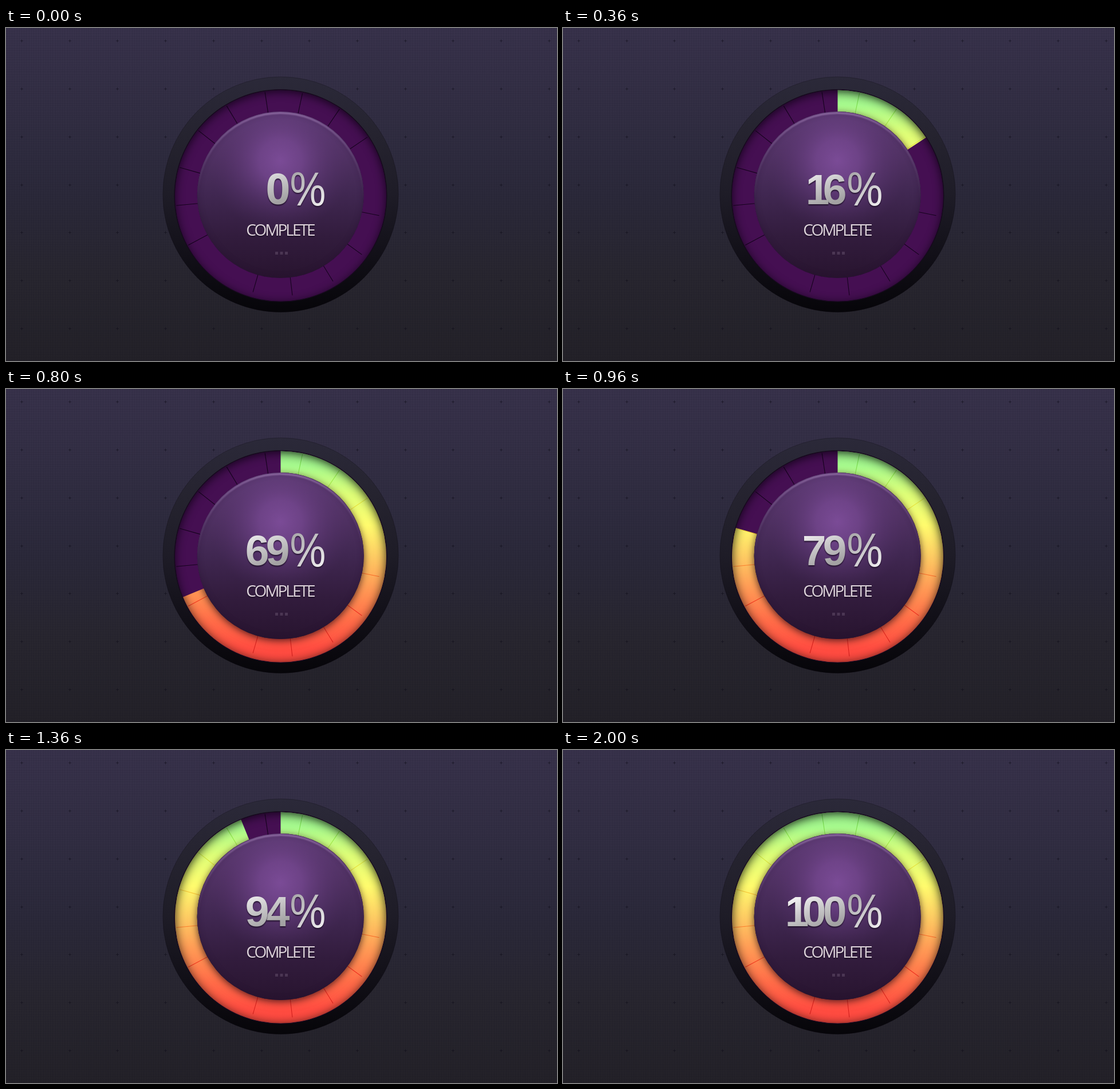
Write an HTML page with a canvas that moves like this. It is 962 px wide and 582 px high and loops after 2040 ms.

```html
<!DOCTYPE html>
<html lang="en">
<head>
<meta charset="utf-8">
<title>Progress dial</title>
<style>
html, body { margin: 0; width: 100%; height: 100%; overflow: hidden; background: #2b2938; }
canvas { display: block; }
</style>
</head>
<body>
<canvas id="stage" width="962" height="582"></canvas>
<script>
const W = 962, H = 582, TAU = Math.PI * 2;
const STEP = 40, STEPS = 51;
const CX = 479.5, CY = 293, R = 184.5;
const DISC = { x: 479.2, y: 291.5, r: 145.5 };
const TICKS = [-8.6, 12, 34.2, 56, 101.4, 126, 148.6, 173.3, 196, 241.8, 264.6, 285.6, 308.4, 329];
const ctx = document.getElementById('stage').getContext('2d');

function layer(draw) {
  const c = document.createElement('canvas');
  c.width = W; c.height = H;
  draw(c.getContext('2d'));
  return c;
}

function fillStops(grad, stops) {
  for (const [at, color] of stops) grad.addColorStop(at, color);
  return grad;
}

const vertical = (g, y0, y1, ...stops) => fillStops(g.createLinearGradient(0, y0, 0, y1), stops);

function circle(g, x, y, r) {
  g.beginPath();
  g.arc(x, y, r, 0, TAU);
}

function shadow(g, color, blur, dy) {
  g.shadowColor = color;
  g.shadowBlur = blur;
  g.shadowOffsetY = dy;
}

// Shadow cast inward from the rim of a circle
function inset(g, x, y, r, color, blur, dy) {
  g.save();
  circle(g, x, y, r);
  g.clip();
  shadow(g, color, blur, dy);
  g.lineWidth = 40;
  g.strokeStyle = '#000';
  circle(g, x, y, r + 20.5);
  g.stroke();
  g.restore();
}

function ticks(g, style) {
  g.strokeStyle = style;
  g.lineWidth = 1.1;
  g.beginPath();
  for (const deg of TICKS) {
    const a = deg * TAU / 360, s = Math.sin(a), c = -Math.cos(a);
    const out = deg > 90 && deg < 200 ? 175.5 : 183;
    g.moveTo(CX + 140 * s, CY + 140 * c);
    g.lineTo(CX + out * s, CY + out * c);
  }
  g.stroke();
}

function drawBase(g) {
  g.fillStyle = vertical(g, 0, H, [0, '#38324b'], [0.25, '#322e43'], [0.5, '#2b293a'], [0.75, '#28262f'], [1, '#232128']);
  g.fillRect(0, 0, W, H);

  const gap = 83.72;
  g.fillStyle = 'rgba(10,8,22,0.055)';
  for (let x = 27 % (gap / 20); x < W; x += gap / 20) g.fillRect(Math.round(x), 0, 1, H);
  for (let y = 22 % (gap / 20); y < H; y += gap / 20) g.fillRect(0, Math.round(y), W, 1);
  g.fillStyle = 'rgba(14,12,24,0.5)';
  for (let x = 27; x < W; x += gap)
    for (let y = 22.4; y < H; y += gap) {
      const px = Math.round(x), py = Math.round(y);
      g.fillRect(px - 2, py, 5, 1);
      g.fillRect(px, py - 2, 1, 5);
    }

  g.fillStyle = vertical(g, 85, 497, [0, '#2b2939'], [0.25, '#25232f'], [0.5, '#1e1c27'], [0.75, '#121018'], [1, '#060509']);
  circle(g, CX, 291, 205.7);
  g.fill();
  g.strokeStyle = 'rgba(8,6,14,0.25)';
  g.lineWidth = 1;
  g.stroke();

  g.fillStyle = '#160a1d';
  circle(g, CX, CY, R + 1.5);
  g.fill();
  g.fillStyle = '#450f52';
  circle(g, CX, CY, R);
  g.fill();
  ticks(g, 'rgba(14,2,20,0.85)');
  inset(g, CX, CY, R, 'rgba(12,2,18,0.85)', 16, 3);
}

function drawColors(g) {
  g.fillStyle = vertical(g, 109, 478, [0, '#98f08c'], [0.07, '#a6f98c'], [0.2, '#dcfd76'], [0.35, '#fffb6c'],
    [0.5, '#fdca62'], [0.64, '#ff9c55'], [0.8, '#ff6c47'], [0.93, '#ff4c40'], [1, '#fb463e']);
  circle(g, CX, CY, R);
  g.fill();
  ticks(g, vertical(g, 109, 478, [0, '#5fc94e'], [0.12, '#8fe848'], [0.25, '#e6e23c'], [0.4, '#fbc136'],
    [0.55, '#fb7a2c'], [0.75, '#ee2b1c'], [1, '#cc1c1c']));
  g.save();
  circle(g, CX, CY, R);
  g.clip();
  shadow(g, 'rgba(25,5,15,0.75)', 13, 3);
  g.fillStyle = '#301838';
  circle(g, DISC.x, DISC.y, DISC.r);
  g.fill();
  g.restore();
  inset(g, CX, CY, R, 'rgba(10,14,8,0.9)', 17, 3);
}

function drawDisc(g) {
  const { x, y, r } = DISC;
  g.fillStyle = vertical(g, y - r, y + r, [0, '#5f3d76'], [0.25, '#513264'], [0.5, '#402751'], [0.75, '#321c3d'], [1, '#28142f']);
  circle(g, x, y, r);
  g.fill();
  g.save();
  g.clip();
  g.fillStyle = fillStops(g.createRadialGradient(x, 232, 0, x, 232, 125),
    [[0, 'rgba(124,76,152,0.97)'], [0.3, 'rgba(117,71,144,0.8)'], [0.65, 'rgba(98,58,122,0.38)'], [1, 'rgba(80,46,100,0)']]);
  g.fillRect(0, 0, W, H);
  g.restore();
  inset(g, x, y, r, 'rgba(36,16,46,0.45)', 12, 0);
  g.save();
  circle(g, x, y, r);
  g.clip();
  g.lineWidth = 3;
  g.filter = 'blur(1px)';
  g.strokeStyle = vertical(g, 146, 300, [0, 'rgba(176,140,196,0.65)'], [0.5, 'rgba(150,115,172,0.3)'], [1, 'rgba(130,95,150,0)']);
  circle(g, x, y + 1, r - 1.5);
  g.stroke();
  g.restore();

  g.save();
  shadow(g, 'rgba(20,8,28,0.7)', 2, 2);
  g.font = '300 80px "Open Sans", "Noto Sans", sans-serif';
  g.font = g.font.replace('300', '400');
  g.fillStyle = fillStops(g.createLinearGradient(500, 255, 550, 310), [[0, '#aaa8ab'], [0.5, '#c9c7ca'], [1, '#eeecee']]);
  g.fillText('%', 494, 309.5);
  g.font = '400 28px "Open Sans", "Noto Sans", sans-serif';
  g.letterSpacing = '-3px';
  g.fillStyle = '#ddd3da';
  g.fillText('COMPLETE', 419.3, 362.5);
  g.restore();

  g.fillStyle = 'rgba(104,84,112,0.5)';
  for (let i = 0; i < 3; i++) g.fillRect(470 + i * 8.5, 391, 5, 5);
}

function drawNumber(g, n) {
  g.save();
  g.font = n ? 'bold 75px "Liberation Sans", Arial, sans-serif' : 'bold 74px "Open Sans", "Noto Sans", sans-serif';
  g.fillStyle = fillStops(g.createLinearGradient(430, 252, 452, 312), [[0, '#efeeef'], [0.45, '#c9c8ca'], [1, '#a3a2a3']]);
  shadow(g, 'rgba(20,8,28,0.75)', 2, 2);
  let x = 453.7;
  for (const d of String(n).split('').reverse()) {
    g.fillText(d, x + (d === '1' ? 6 : 0), 308.2);
    x -= 36;
  }
  g.restore();
}

// Cubic easing with handles (0.34, 0) and (0.145, 1)
function ease(t) {
  let lo = 0, hi = 1;
  for (let i = 0; i < 30; i++) {
    const s = (lo + hi) / 2, q = 1 - s;
    if (1.02 * s * q * q + 0.435 * s * s * q + s * s * s < t) lo = s; else hi = s;
  }
  return lo * lo * (3 - 2 * lo);
}

const base = layer(drawBase), colors = layer(drawColors), disc = layer(drawDisc);

function frame(now) {
  const k = Math.floor(now / STEP) % STEPS;
  const p = k === 0 ? 0 : k === STEPS - 1 ? 1 : ease(k / (STEPS - 1));
  ctx.drawImage(base, 0, 0);
  if (p > 0) {
    ctx.save();
    ctx.beginPath();
    ctx.moveTo(CX, CY);
    ctx.arc(CX, CY, R + 1, -TAU / 4, -TAU / 4 + TAU * p);
    ctx.clip();
    ctx.drawImage(colors, 0, 0);
    ctx.restore();
  }
  ctx.drawImage(disc, 0, 0);
  drawNumber(ctx, Math.round(p * 100));
}

let start;
function loop(now) {
  if (start === undefined) start = now;
  frame(now - start);
  requestAnimationFrame(loop);
}
frame(0);
requestAnimationFrame(loop);
</script>
</body>
</html>
```
